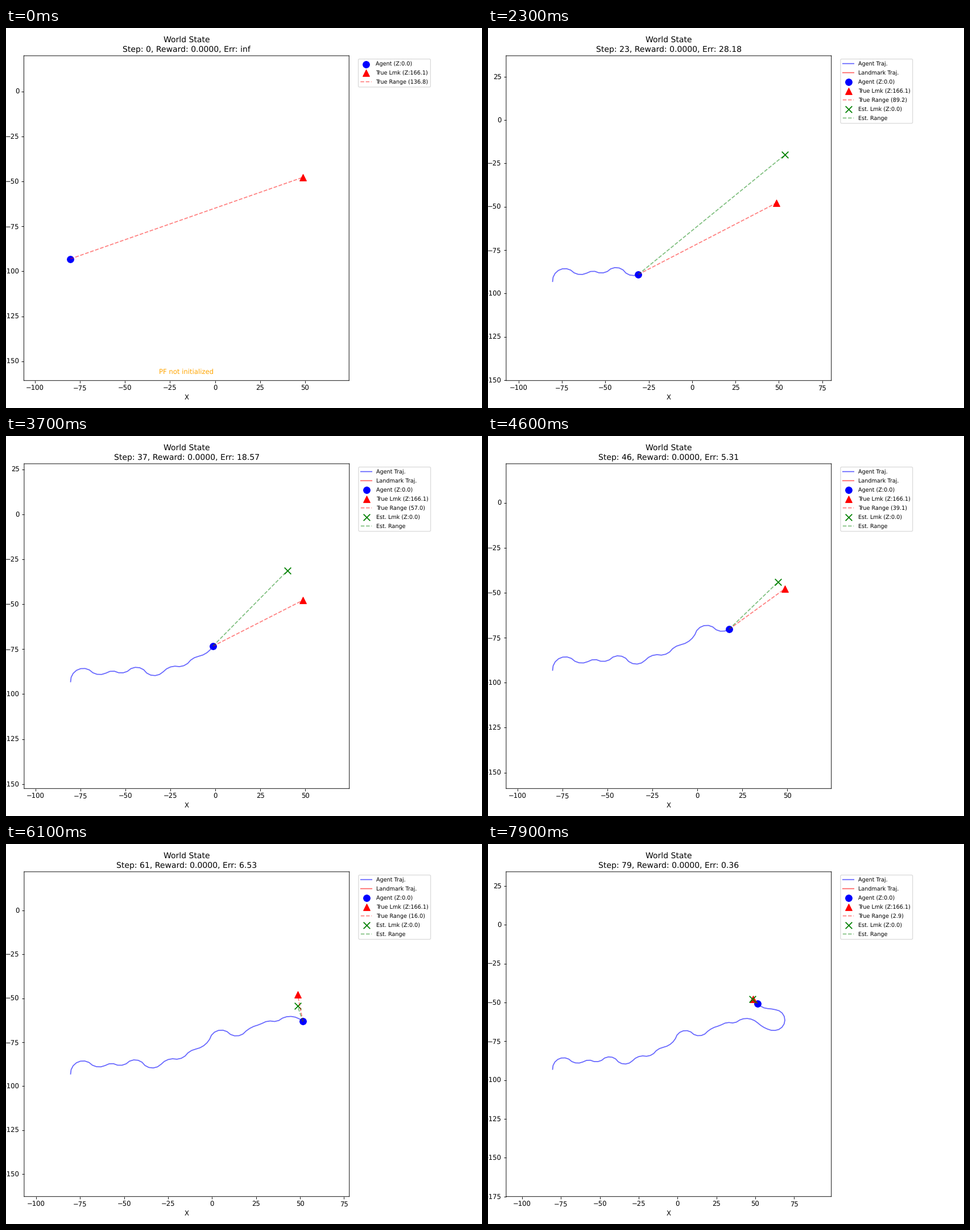
These frames come from a looping animation (837 by 669 pixels, 8 s). A matplotlib script:

```python
import matplotlib.pyplot as plt
import numpy as np
from matplotlib.animation import FuncAnimation
from matplotlib.ticker import MultipleLocator

W, H, DPI = 837, 669, 83.7
STEPS, INTERVAL = 80, 100
SIDE, BOTTOM = 571.8, 48.3
START = np.array([-80.4, -93.1])
LANDMARK = np.array([48.6, -47.8])
SPEED = 2.49

# Steering: heading in degrees at each turning point, linear in between.
STEERING = [
    (0, 83), (6, -39), (9.7, 30), (12, -20), (15, 38), (19, -48),
    (23.6, 48), (27, -6), (30, 48), (32.5, 11), (37, 66), (42, -40),
    (46, 44), (49, 18), (51, 25), (53, -7), (55, 33), (57.5, -3),
    (60.5, -43), (64, -18), (66, 14), (73, 164), (75.5, 177), (78, 137)]

# Filter state: step, offset of the estimate from the landmark, range reading.
FILTER = [
    (0, 4, -44, 136.8), (11, -2.2, -35, 113.9), (23, 4.85, 27.76, 89.2),
    (37, -8.5, 16.51, 57.0), (55, 0.9, -9.096, 18.9), (68, -1.2, -3.54, 26.0),
    (79, -0.35, -0.1, 2.9)]

# Soft edges and unhinted glyphs, as in a smoothly resized picture.
plt.rcParams.update({"path.snap": False, "text.hinting": "none"})


def drive():
    heading = np.radians(np.interp(np.arange(STEPS - 1), *zip(*STEERING)))
    moves = SPEED * np.column_stack([np.cos(heading), np.sin(heading)])
    return np.vstack([START, START + moves.cumsum(axis=0)])


def run_filter(path):
    steps = np.arange(STEPS)
    key, dx, dy, reading = np.array(FILTER).T
    offset = np.column_stack([np.interp(steps, key, d) for d in (dx, dy)])
    dist = np.hypot(*(path - LANDMARK).T)
    noise = reading - dist[key.astype(int)]
    return LANDMARK + offset, dist + np.interp(steps, key, noise)


PATH = drive()
ESTIMATE, RANGE = run_filter(PATH)

fig = plt.figure(figsize=(10.0001, 7.9929), dpi=DPI, facecolor="white")
ax = fig.add_axes([0, 0, 1, 1])


def segment(a, b, color, label):
    ax.plot([a[0], b[0]], [a[1], b[1]], color + "--", alpha=0.5, label=label)


def marker(pos, color, shape, label):
    ax.scatter(*pos, c=color, marker=shape, s=100, label=label)


def fit_view(points):
    lo, hi = points.min(axis=0), points.max(axis=0)
    mid, half = (lo + hi) / 2, 0.7 * (hi - lo).max()
    ax.set_xlim(mid[0] - half, mid[0] + half)
    ax.set_ylim(mid[1] - half, mid[1] + half)
    for axis in (ax.xaxis, ax.yaxis):
        axis.set_major_locator(MultipleLocator(25))


def draw(step):
    ax.cla()
    agent, trail = PATH[step], PATH[:step + 1]
    est, rng = ESTIMATE[step], RANGE[step]
    # A wider legend pushes the axes slightly to the left.
    left = 31.4 if rng >= 100 else 31.9
    ax.set_position([left / W, BOTTOM / H, SIDE / W, SIDE / H])

    points, err = [trail, LANDMARK], "inf"
    if step:
        ax.plot(*trail.T, "b-", alpha=0.6, label="Agent Traj.")
        ax.plot(*np.tile(LANDMARK, (2, 1)).T, "r-", alpha=0.6,
                label="Landmark Traj.")
    marker(agent, "blue", "o", "Agent (Z:0.0)")
    marker(LANDMARK, "red", "^", "True Lmk (Z:166.1)")
    segment(agent, LANDMARK, "r", f"True Range ({rng:.1f})")
    if step:
        points.append(est)
        err = f"{np.hypot(*(est - LANDMARK)):.2f}"
        marker(est, "green", "x", "Est. Lmk (Z:0.0)")
        segment(agent, est, "g", "Est. Range")
    else:
        ax.text(0.5, 0.02, "PF not initialized", color="orange", ha="center",
                transform=ax.transAxes)

    fit_view(np.vstack(points))
    ax.set_xlabel("X")
    ax.set_title(f"World State\nStep: {step}, Reward: 0.0000, Err: {err}",
                 linespacing=1.37)
    ax.legend(loc="upper left", bbox_to_anchor=(1.02, 0.9985),
              fontsize="small", labelspacing=0.65)
    return ax.get_children()


anim = FuncAnimation(fig, draw, frames=STEPS, init_func=lambda: [],
                     interval=INTERVAL, repeat=True, repeat_delay=0)
plt.show()
```
